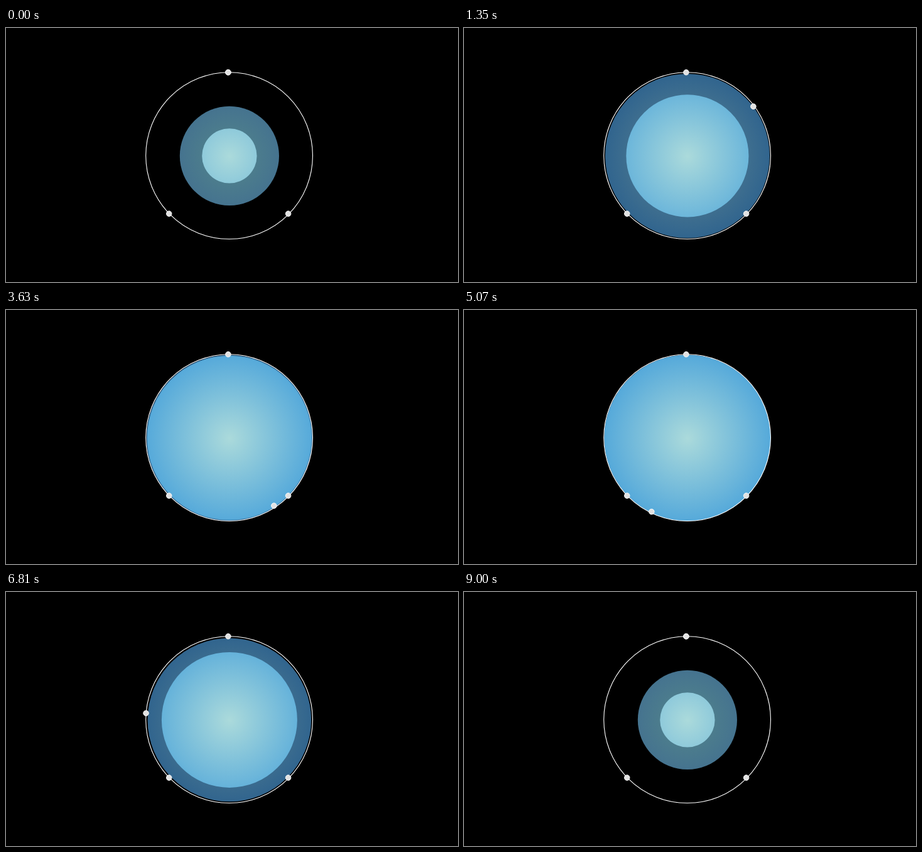
Write an HTML page that moves like this. It is 720 px wide and 405 px high and loops after 9.03 s.

```html
<!DOCTYPE html>
<html lang="en">
<head>
<meta charset="utf-8">
<title>Breathing circle</title>
<style>
  html, body { margin: 0; width: 100%; height: 100%; overflow: hidden; background: #000; }
  svg { display: block; width: 100vw; height: 100vh; }
</style>
</head>
<body>
<svg viewBox="0 0 720 405">
  <defs>
    <radialGradient id="light" gradientUnits="userSpaceOnUse" cx="356" cy="204.5" r="133">
      <stop offset="0" stop-color="#abdadb"/>
      <stop offset="1" stop-color="#55a9da"/>
    </radialGradient>
    <radialGradient id="deep" gradientUnits="userSpaceOnUse" cx="356" cy="204.5" r="133">
      <stop offset="0" stop-color="#54878a"/>
      <stop offset=".6" stop-color="#45738f"/>
      <stop offset="1" stop-color="#30648e"/>
    </radialGradient>
    <circle id="dot" r="4.3" fill="#e2e2e2" stroke="#fff" stroke-width=".9"/>
  </defs>
  <circle id="outer" cx="355.9" cy="203.9" fill="url(#deep)"/>
  <circle id="inner" cx="355.9" cy="203.9" fill="url(#light)"/>
  <circle cx="355.6" cy="203.6" r="132.9" fill="none" stroke="#fff" stroke-width="1.1"/>
  <use href="#dot" x="353.9" y="70.7"/>
  <use href="#dot" x="449.6" y="296.1"/>
  <use href="#dot" x="259.7" y="296.1"/>
  <use href="#dot" id="runner"/>
</svg>
<script>
const LOOP = 9030, STEP = 30, FULL = 132.5;
const orbit = { x: 354.3, y: 202.3, r: 131.6 };
const [outer, inner, runner] = ['outer', 'inner', 'runner'].map(id => document.getElementById(id));

// Keys are [seconds, radius, radius change per second].
const outerExhale = [[6.35, FULL, 0], [6.81, 130.3, -12], [7.44, 118, -26], [8.01, 102.2, -27.5], [9, 79.1, -19]];
const innerExhale = [[5.2, FULL, 0], [6.81, 108, -30], [8.01, 69, -31], [9, 43.7, -20]];

const inhale = (t, from, duration, power) =>
  FULL - (FULL - from) * Math.max(0, 1 - t / duration) ** power;

function hermite(keys, t) {
  const last = keys[keys.length - 1];
  if (t >= last[0]) return last[1];
  const i = keys.findIndex(key => key[0] > t);
  const [t0, r0, v0] = keys[i - 1], [t1, r1, v1] = keys[i];
  const d = t1 - t0, u = (t - t0) / d, w = 1 - u;
  return w * w * ((1 + 2 * u) * r0 + u * d * v0) + u * u * ((3 - 2 * u) * r1 - w * d * v1);
}

const radius = (t, keys, ...grow) => t < keys[0][0] ? inhale(t, ...grow) : hermite(keys, t);

// Inhale and hold share one speed; the exhale arc is slightly slower.
function runnerAngle(t) {
  const turn = 5.572, mark = 225.3;
  const degrees = t < turn
    ? mark * Math.max(0, t - 0.016) / (turn - 0.016)
    : mark + (360 - mark) * Math.min(1, (t - turn) / (9 - turn));
  return degrees * Math.PI / 180;
}

function draw(ms) {
  const t = Math.floor(ms % LOOP / STEP) * STEP / 1000;
  outer.setAttribute('r', radius(t, outerExhale, 79.1, 1.62, 2));
  inner.setAttribute('r', radius(t, innerExhale, 43.7, 4.55, 2.65));
  const a = runnerAngle(t);
  runner.setAttribute('x', orbit.x + orbit.r * Math.sin(a) - 0.4 * Math.max(0, Math.cos(a)) ** 8);
  runner.setAttribute('y', orbit.y - orbit.r * Math.cos(a));
}

const start = performance.now();
function tick() {
  draw(performance.now() - start);
  requestAnimationFrame(tick);
}
tick();
</script>
</body>
</html>
```
